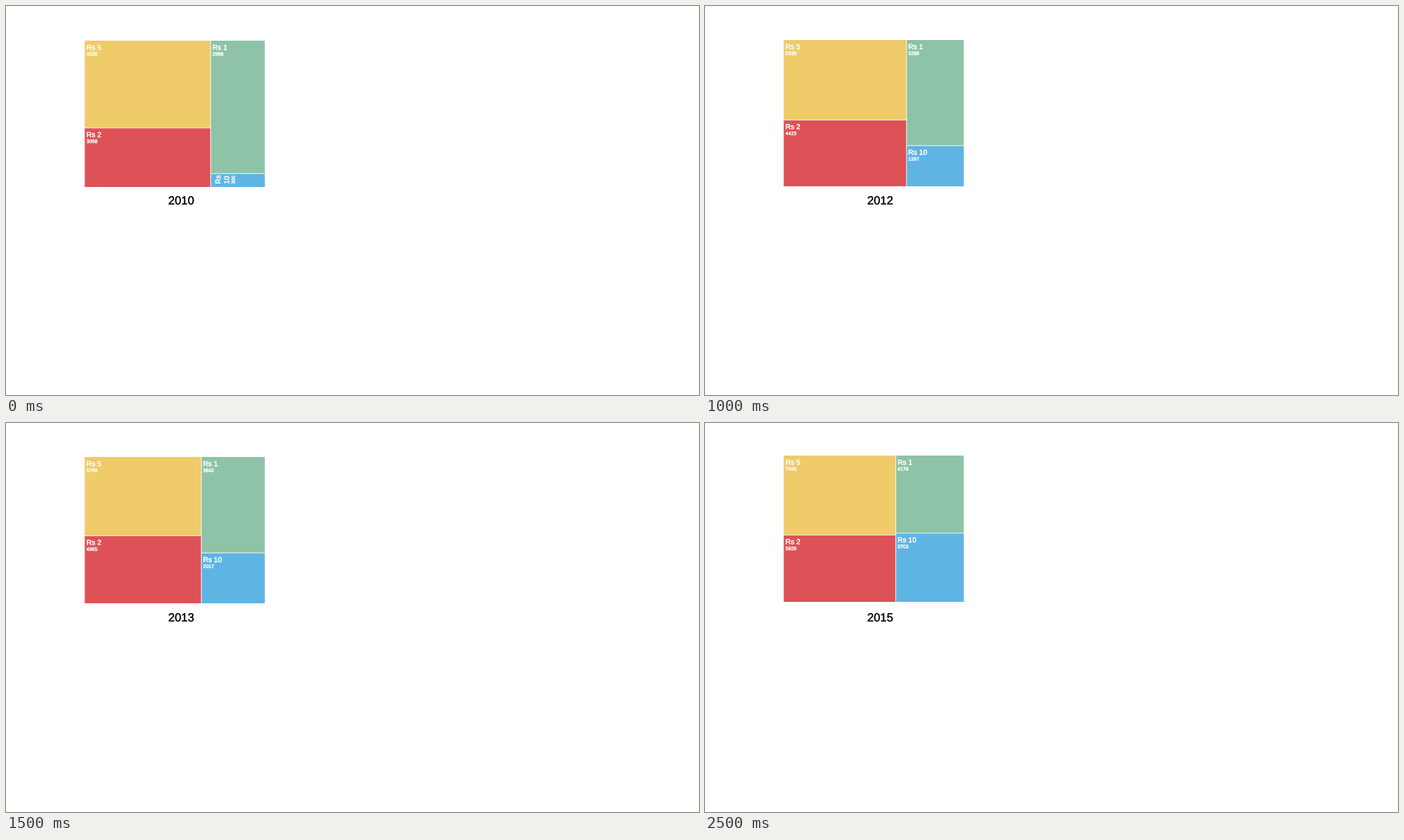
A matplotlib script for the animation above (3 s loop, 998 by 561 pixels).

```python
import matplotlib.pyplot as plt
from matplotlib.animation import FuncAnimation
from matplotlib.patches import Rectangle
from matplotlib.patheffects import withStroke

W, H, DPI = 998, 561, 64
LEFT, WIDTH, HEIGHT = 113.4, 259.3, 211
FIRST_YEAR = 2010
COLORS = {5: "#efcb69", 2: "#dd5256", 1: "#8ec3a7", 10: "#5eb5e4"}

# top edge of the chart, then the counts of Rs 5, Rs 2, Rs 1 and Rs 10
ROWS = [
    (50, 4535, 3068, 2968, 300),
    (51, 4990, 3640, 3142, 648),
    (49, 5338, 4423, 3289, 1267),
    (49, 5789, 4965, 3842, 2017),
    (45, 6380, 5407, 3863, 2750),
    (47, 7045, 5926, 4178, 3703),
]

fig = plt.figure(figsize=(W / DPI, H / DPI), dpi=DPI, facecolor="white")
ax = fig.add_axes([0, 0, 1, 1])


def px(size):
    return size * 72 / DPI


def write(x, y, text, size, color="white", **kw):
    # the thin stroke gives the text a slightly heavier weight
    ax.text(x, y, text, fontsize=px(size), color=color, va="baseline",
            family="Liberation Sans", rotation_mode="anchor",
            path_effects=[withStroke(linewidth=px(0.3), foreground=color)],
            **kw)


def label(x, y, height, coin, count):
    """Coin name over its count, turned upright and wrapped in a flat tile."""
    upright = height < 25
    name = ["Rs", str(coin)] if upright else [f"Rs {coin}"]
    pos = 14.2 if upright else 13.2
    for text in name:
        place(x, y, pos, text, 10.4, upright)
        pos += 12.3
    place(x, y, pos - 3.8, str(count), 7.1, upright)


def place(x, y, pos, text, size, upright):
    if upright:
        write(x + pos, y + 15, text, size, rotation=90)
    else:
        write(x + 2.5, y + pos, text, size)


def seam(xs, ys):
    ax.plot(xs, ys, color="white", alpha=0.8, lw=px(1.1), snap=False,
            solid_capstyle="butt")


def column(x0, x1, y0, top, bottom):
    """Two stacked tiles sharing the chart height by their counts."""
    split = y0 + HEIGHT * top[1] / (top[1] + bottom[1])
    for (coin, count), a, b in ((top, y0, split),
                                (bottom, split, y0 + HEIGHT)):
        ax.add_patch(Rectangle((x0, a), x1 - x0, b - a, lw=0, snap=False,
                               facecolor=COLORS[coin]))
        label(x0, a, b - a, coin, count)
    seam((x0, x1), (split, split))


def draw(i):
    ax.clear()
    ax.set_xlim(0, W)
    ax.set_ylim(H, 0)
    ax.axis("off")
    y0, *counts = ROWS[i]
    tiles = list(zip(COLORS, counts))
    middle = LEFT + WIDTH * sum(counts[:2]) / sum(counts)
    column(LEFT, middle, y0, *tiles[:2])
    column(middle, LEFT + WIDTH, y0, *tiles[2:])
    seam((middle, middle), (y0, y0 + HEIGHT))
    write(252.4, 286.1, str(FIRST_YEAR + i), 16.8, "#0c0c0c", ha="center")
    return []


anim = FuncAnimation(fig, draw, frames=len(ROWS), init_func=lambda: [],
                     interval=500, repeat=True, repeat_delay=0)
plt.show()
```
